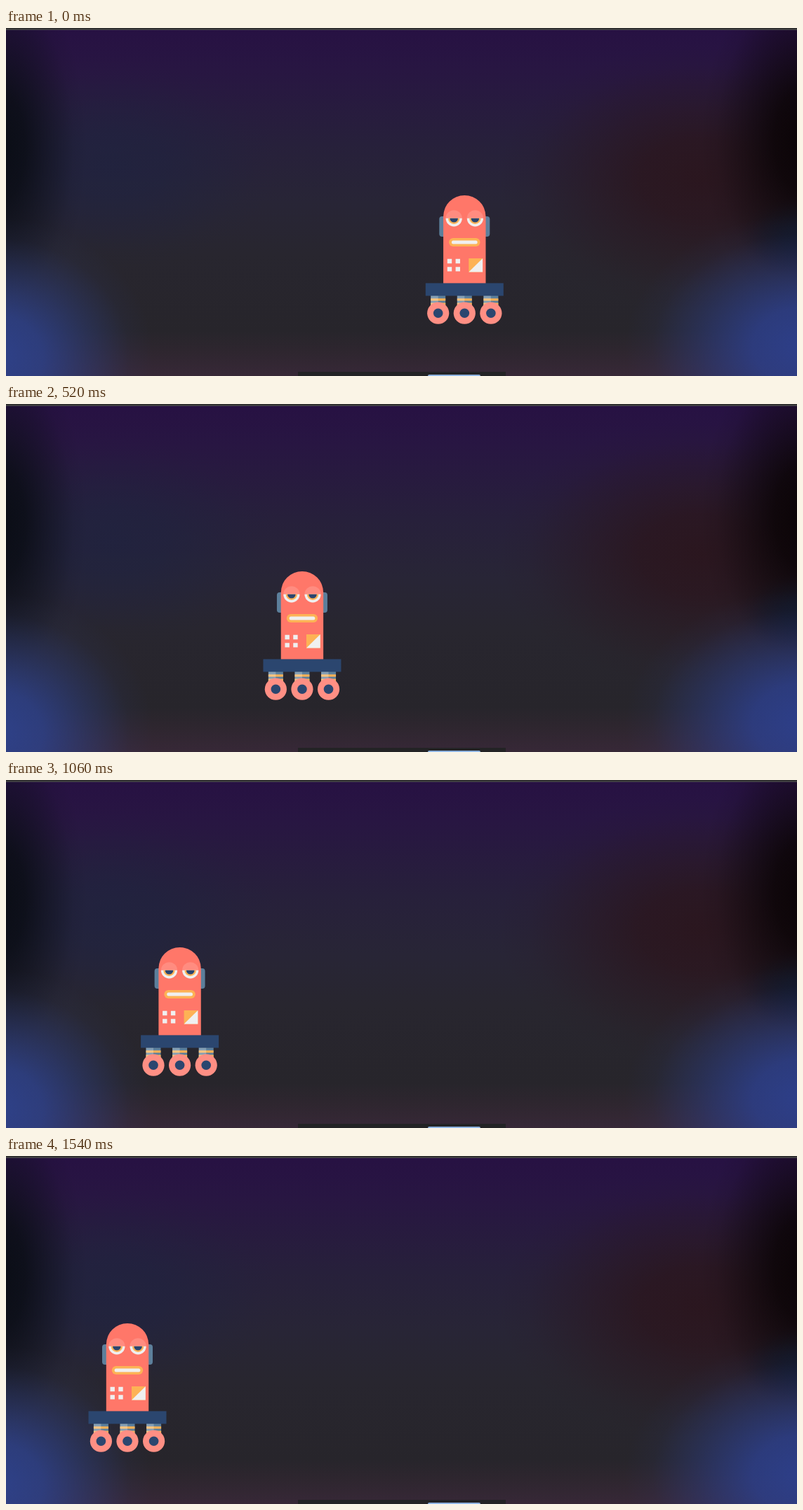
Recreate the animation shown at these times as an HTML page. Size 1127x497 px, loop 1610 ms.

```html
<!DOCTYPE html>
<html lang="en">
<head>
<meta charset="utf-8">
<title>Rolling robot</title>
<style>
  html, body { margin: 0; width: 100%; height: 100%; overflow: hidden; background: #27252c; }
  svg { display: block; width: 100%; height: 100%; }
</style>
</head>
<body>
<svg viewBox="0 0 1127 497" preserveAspectRatio="none">
  <defs>
    <linearGradient id="sky" x2="0" y2="1">
      <stop offset="0" stop-color="#271143"/>
      <stop offset=".12" stop-color="#281642"/>
      <stop offset=".33" stop-color="#27203b"/>
      <stop offset=".5" stop-color="#282536"/>
      <stop offset=".65" stop-color="#28262f"/>
      <stop offset=".87" stop-color="#27252b"/>
      <stop offset=".93" stop-color="#2e262f"/>
      <stop offset="1" stop-color="#372837"/>
    </linearGradient>
    <g id="eye">
      <circle r="11.6" fill="#ff8c80"/>
      <path d="M-11.6 0a11.6 11.6 0 0 0 23.2 0z" fill="#f0f0f0"/>
      <path d="M-8.2 0a8.2 8.2 0 0 0 16.4 0z" fill="#fdb255"/>
      <path d="M-5.8 0a5.8 5.8 0 0 0 11.6 0z" fill="#2b466f"/>
    </g>
    <g id="leg">
      <path d="M-10.5 382h21v14h-21z" fill="#5c7f9b"/>
      <path d="M-10.5 386.2h21v3.2h-21zM-10.5 392.4h21v3.6h-21z" fill="#fdb255"/>
      <path d="M-10.5 382h10.5v14h-10.5z" fill="#fff" opacity=".25"/>
      <circle cy="407.2" r="15.6" fill="#ff8f84"/>
      <circle cy="407.2" r="6.8" fill="#2b466f"/>
    </g>
  </defs>
  <rect width="1127" height="497" fill="url(#sky)"/>
  <g id="glows"></g>
  <rect width="1127" height="2" fill="#303030"/>
  <rect y="2" width="1127" height="1" fill="#4c4a50"/>
  <rect x="416" y="491" width="296" height="6" fill="#232325"/>
  <rect x="601" y="495" width="75" height="6" rx="2" fill="#8fb3e0"/>

  <g id="robot">
    <rect x="-36" y="269" width="72" height="29" rx="4" fill="#5c7f9b"/>
    <path d="M-30.2 365v-95.8a30.2 30.2 0 0 1 60.4 0v95.8z" fill="#ff7769"/>
    <use href="#eye" x="-15.1" y="271.8"/>
    <use href="#eye" x="15.1" y="271.8"/>
    <rect x="-22.2" y="300" width="44.4" height="12" rx="6" fill="#fdb255"/>
    <rect x="-18.4" y="303.5" width="36.8" height="5" rx="2.5" fill="#f0f0f0"/>
    <path d="M-24.5 329.8h6.4v6.4h-6.4zM-12.7 329.8h6.4v6.4h-6.4zM-24.5 341.2h6.4v6.4h-6.4zM-12.7 341.2h6.4v6.4h-6.4z" fill="#f0f0f0"/>
    <path d="M6 329h19.8v19.5h-19.8z" fill="#fdb255"/>
    <path d="M25.8 329v19.5h-19.8z" fill="#f0f0f0"/>
    <use href="#leg" x="-37.6"/>
    <use href="#leg"/>
    <use href="#leg" x="37.6"/>
    <rect x="-55.5" y="364.4" width="111" height="18.1" fill="#2b466f"/>
  </g>
</svg>
<script>
const LOOP = 1610;
const NS = 'http://www.w3.org/2000/svg';

function add(parent, tag, attrs) {
  const el = document.createElementNS(NS, tag);
  for (const key in attrs) el.setAttribute(key, attrs[key]);
  return parent.appendChild(el);
}

// Soft background lights: centre, radii, colour, strength
const glows = [
  [150, 195, 240, 150, '#1f2340', .7],
  [990, 215, 290, 190, '#2b151c', .9],
  [-10, 170, 125, 260, '#0a0d15', 1],
  [1140, 160, 150, 250, '#0b0406', 1],
  [1135, 300, 90, 60, '#101828', .8],
  [-15, 470, 225, 200, '#2e4189', 1],
  [1142, 455, 260, 190, '#2d3f8a', 1]
];
const layer = document.getElementById('glows');
glows.forEach(([cx, cy, rx, ry, color, strength], i) => {
  const grad = add(layer, 'radialGradient', { id: 'glow' + i });
  [[0, 1], [.3, .85], [.6, .42], [.85, .08], [1, 0]].forEach(([offset, alpha]) =>
    add(grad, 'stop', { offset, 'stop-color': color, 'stop-opacity': alpha * strength }));
  add(layer, 'ellipse', { cx, cy, rx, ry, fill: `url(#glow${i})` });
});

// Robot centre along its path: [ms, x]
const path = [
  [0, 653.3], [330, 502.7], [580, 397.5], [650, 373.5], [880, 302.4],
  [1060, 247.6], [1130, 232], [1340, 194.2], [1540, 173]
];
// Moments at which the pose is refreshed
const ticks = [0, 70, 130, 200, 260, 330, 390, 460, 520, 580, 650, 720, 800,
  880, 930, 1000, 1060, 1130, 1200, 1270, 1340, 1400, 1470, 1540];

const slope = (a, b) => (path[b][1] - path[a][1]) / (path[b][0] - path[a][0]);
const tangent = i => slope(Math.max(i - 1, 0), Math.min(i + 1, path.length - 1));

function robotX(t) {
  let i = 0;
  while (i < path.length - 2 && t > path[i + 1][0]) i++;
  const [t0, x0] = path[i], [t1, x1] = path[i + 1];
  const d = t1 - t0, u = (t - t0) / d, v = 1 - u;
  return x0 * v * v * (1 + 2 * u) + x1 * u * u * (3 - 2 * u)
    + d * u * v * (v * tangent(i) - u * tangent(i + 1));
}

const robot = document.getElementById('robot');

function draw(ms) {
  const t = ms % LOOP;
  const tick = ticks.filter(k => k <= t).pop();
  robot.setAttribute('transform', `translate(${robotX(tick).toFixed(2)} 0)`);
}

const start = performance.now();
function frame() {
  draw(performance.now() - start);
  requestAnimationFrame(frame);
}
frame();
</script>
</body>
</html>
```
